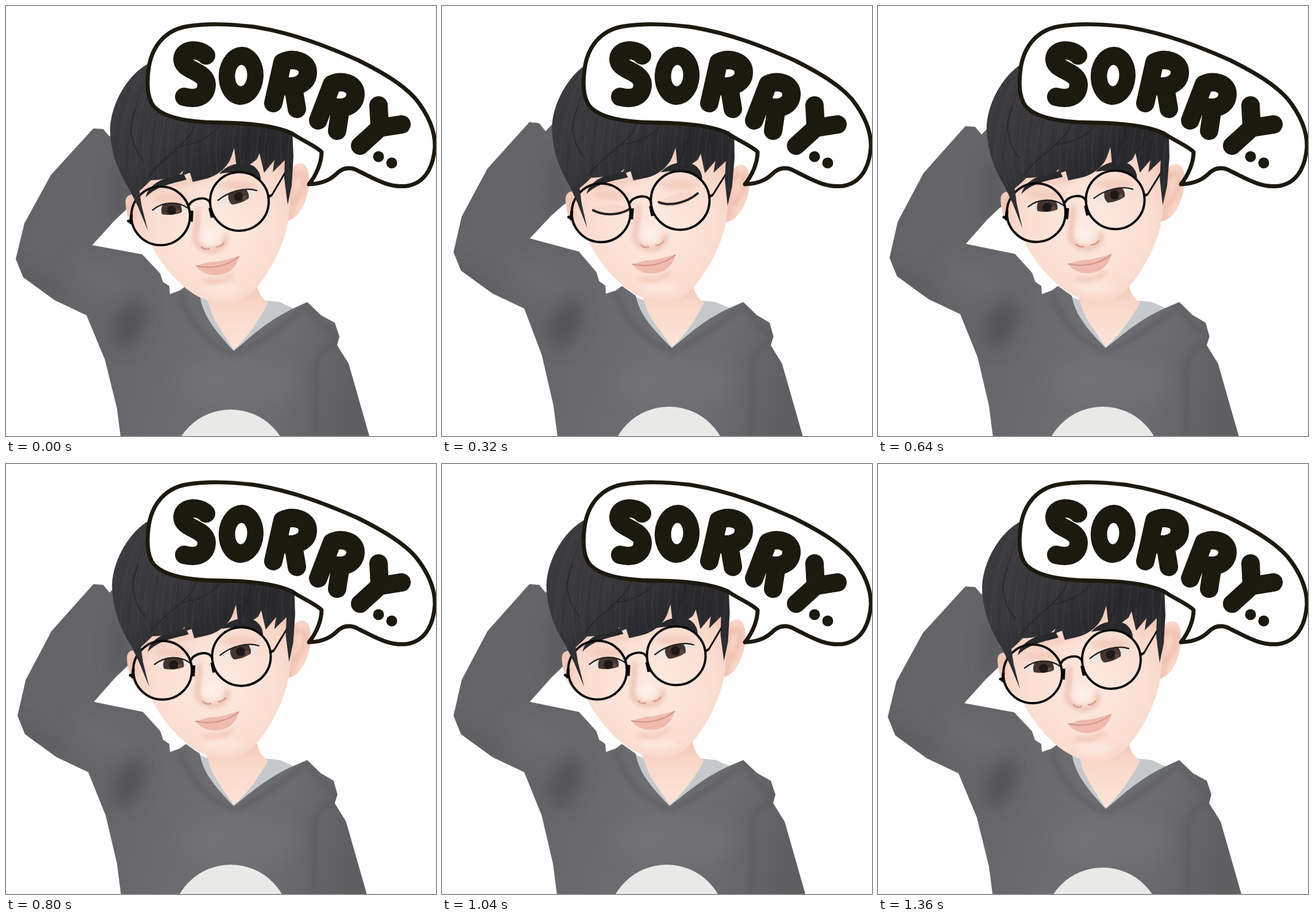
An HTML page that plays this animation: 748 by 748 pixels, repeating every 1440 ms.

```html
<!DOCTYPE html>
<html lang="en">
<head>
<meta charset="utf-8">
<title>Sorry</title>
<style>
html, body { margin: 0; width: 100%; height: 100%; overflow: hidden; background: #fefefe; }
svg { display: block; width: 100vw; height: 100vh; }
.ink { fill: none; stroke: #1c190e; stroke-linecap: round; stroke-linejoin: round; }
.wire { fill: none; stroke: #080808; stroke-width: 4; stroke-linecap: round; stroke-linejoin: round; }
</style>
</head>
<body>
<svg viewBox="0 0 748 748" role="img" aria-label="Sorry..">
  <defs>
    <linearGradient id="cloth" gradientUnits="userSpaceOnUse" x1="20" y1="420" x2="630" y2="560">
      <stop offset="0" stop-color="#646467"/><stop offset=".3" stop-color="#66666a"/>
      <stop offset=".6" stop-color="#6e6e72"/><stop offset=".8" stop-color="#6c6c70"/>
      <stop offset="1" stop-color="#5f5f62"/>
    </linearGradient>
    <radialGradient id="skin" gradientUnits="userSpaceOnUse" cx="365" cy="390" r="170">
      <stop offset="0" stop-color="#fdeae1"/><stop offset=".6" stop-color="#fbdfd3"/>
      <stop offset=".85" stop-color="#f8d5c7"/><stop offset="1" stop-color="#efc5b5"/>
    </radialGradient>
    <linearGradient id="throat" x1="0" y1="0" x2="0" y2="1">
      <stop offset="0" stop-color="#ecc0af"/><stop offset=".4" stop-color="#f9d8ca"/>
      <stop offset="1" stop-color="#fde4d9"/>
    </linearGradient>
    <linearGradient id="ear" x1="0" y1="0" x2="1" y2="0">
      <stop offset="0" stop-color="#eeb9a8"/><stop offset=".6" stop-color="#fad9cc"/>
      <stop offset="1" stop-color="#f6cdbf"/>
    </linearGradient>
    <linearGradient id="hair" gradientUnits="userSpaceOnUse" x1="185" y1="140" x2="330" y2="310">
      <stop offset="0" stop-color="#3d3d40"/><stop offset=".55" stop-color="#39393c"/>
      <stop offset="1" stop-color="#2a2a2d"/>
    </linearGradient>
    <filter id="soft" x="-60%" y="-60%" width="220%" height="220%"><feGaussianBlur stdDeviation="15"/></filter>
    <filter id="blur" x="-50%" y="-50%" width="200%" height="200%"><feGaussianBlur stdDeviation="4"/></filter>
    <clipPath id="inHoodie"><use href="#hoodie"/></clipPath>
    <clipPath id="inHair"><use href="#mane"/></clipPath>
    <clipPath id="inFace"><use href="#faceShape"/></clipPath>
    <clipPath id="inEyeL"><path id="clipL"/></clipPath>
    <clipPath id="inEyeR"><path id="clipR"/></clipPath>
  </defs>
  <rect width="748" height="748" fill="#fefefe"/>

  <path class="warp" fill="#c5c9cc" d="M337,506L352,512L396,590L440,512L458,513L476,515L500,526L470,570L396,610L340,560Z"/>
  <path class="warp" fill="url(#throat)" d="M340,485L354,522C358,540 368,555 396,598C412,585 438,552 456,516C444,508 436,496 434,470Z"/>
  <path id="hoodie" class="warp" fill="url(#cloth)" d="M152,213L169,214L180,227L200,205L235,270L222,345L209,354L188,374L150,416L237,432L268,465L273,480L284,487L285,501L302,495L313,487L337,504C343,535 355,555 396,600C425,577 450,550 500,526L524,515L548,538L572,551L580,575L576,590L596,622L636,762L201,762L193,700L172,615L140,538L85,512L30,472L17,440L32,378L78,294L130,237Z"/>
  <g clip-path="url(#inHoodie)">
    <g filter="url(#soft)">
      <ellipse cx="200" cy="320" rx="18" ry="62" fill="#525255" opacity=".5"/>
      <ellipse cx="55" cy="482" rx="62" ry="12" fill="#555558" opacity=".5" transform="rotate(28 55 482)"/>
      <ellipse cx="215" cy="552" rx="24" ry="46" fill="#4b4b4e" opacity=".65" transform="rotate(20 215 552)"/>
      <ellipse cx="170" cy="475" rx="60" ry="30" fill="#707073" opacity=".5" transform="rotate(30 170 475)"/>
      <ellipse cx="404" cy="655" rx="105" ry="46" fill="#76767a" opacity=".5"/>
    </g>
    <g class="folds" fill="none" stroke="#58585b" stroke-width="7" filter="url(#blur)" opacity=".55">
      <path class="warp" d="M302,497C316,548 350,590 396,606C440,590 488,552 526,519C542,550 562,568 582,577"/>
      <path class="warp" d="M578,588C548,592 534,618 540,655L538,750"/>
    </g>
    <circle id="belly" cx="391" cy="805" r="103" fill="#e9e9e8"/>
  </g>

  <g id="ears">
    <path d="M234 332C222 324 207 327 208 342C209 368 222 402 250 410Z" fill="url(#skin)"/>
    <path d="M228 340C216 336 214 350 222 372" fill="none" stroke="#e9b3a2" stroke-width="5" filter="url(#blur)"/>
    <path d="M484 300C496 280 506 272 515 274C527 277 530 300 525 324C518 354 504 374 484 374Z" fill="url(#ear)"/>
    <path d="M498 300C508 286 519 287 517 306C514 328 506 338 499 346" fill="none" stroke="#e9ad9b" stroke-width="6" filter="url(#blur)" opacity=".8"/>
  </g>

  <g id="jaw">
    <path id="faceShape" fill="url(#skin)" d="M226 330C228 270 270 235 360 225C450 220 492 250 495 300C496 350 491 384 483 405C468 448 445 482 425 501C410 513 396 518 378 517C350 515 334 507 314 492C290 473 268 445 254 418C238 390 227 362 226 330Z"/>
    <g clip-path="url(#inFace)" filter="url(#blur)">
      <path d="M240 318C300 310 330 312 390 272S460 285 495 280" fill="none" stroke="#eebfae" stroke-width="10" opacity=".6"/>
      <ellipse cx="376" cy="494" rx="32" ry="11" fill="#fde8df" opacity=".8"/>
    </g>
  </g>

  <g id="mouth">
    <path d="M343 477Q372 485 396 466" fill="none" stroke="#edbbab" stroke-width="5" filter="url(#blur)"/>
    <path d="M330 452C344 449 352 444 364 445C380 443 392 438 406 435C402 452 390 466 368 468C350 469 338 462 330 452Z" fill="#efbbae"/>
    <path d="M331 452C352 457 382 455 405 436" fill="none" stroke="#d4978a" stroke-width="2.2" stroke-linecap="round"/>
  </g>

  <g id="face">
    <g filter="url(#blur)">
      <path d="M333 352C334 376 330 390 329 405C332 420 348 427 362 425C376 422 386 412 381 398" fill="none" stroke="#e0a593" stroke-width="6" opacity=".8"/>
      <ellipse cx="354" cy="400" rx="11" ry="12" fill="#fff0ea"/>
      <ellipse cx="287" cy="334" rx="32" ry="8" fill="#f0c3b4" opacity=".7"/>
      <ellipse cx="403" cy="313" rx="33" ry="8" fill="#f0c3b4" opacity=".7"/>
    </g>
    <path d="M340 419Q346 425 353 422M366 419Q374 419 379 412" fill="none" stroke="#cf8f7e" stroke-width="2.5" stroke-linecap="round" opacity=".8"/>
    <path d="M243 333C247 310 276 296 309 292L314 302C294 308 262 312 243 333Z" fill="#29282a"/>
    <path d="M371 292C385 274 413 269 430 278C440 285 444 295 443 304C428 290 402 286 371 292Z" fill="#29282a"/>
    <g id="eyes"></g>
    <g class="wire">
      <circle cx="269" cy="365" r="51"/>
      <circle cx="406" cy="340" r="51"/>
      <path d="M319 346C322 336 349 328 355 343"/>
      <path d="M457 331L463 328L489 284M456 333L462 330" stroke-width="3"/>
      <path d="M218 364L217 377M213 374L218 376" stroke-width="5"/>
      <path d="M323 356L322 375M355 351L359 368" stroke-width="6" stroke-linecap="butt"/>
    </g>
  </g>

  <g id="head">
    <path id="mane" fill="url(#hair)" d="M246 101C212 120 183 168 181 214C182 260 198 292 214 318L229 348L247 391L236 348L232 322L243 312L252 303C270 303 288 298 300 294L309 286L304 296L320 290L325 306L346 301C368 296 386 280 392 262L397 247L401 280L424 276L436 267L441 256L449 290L467 268L464 289L485 268L484 300L490 346L497 312L500 262L498 215L420 120Z"/>
    <g clip-path="url(#inHair)" fill="none">
      <g id="strands"></g>
      <g stroke="#222225" stroke-width="2" opacity=".6">
        <path d="M226 180C208 215 222 250 240 270"/>
        <path d="M330 202C322 240 270 262 246 300"/>
        <path d="M374 205C352 232 330 240 302 244"/>
        <path d="M420 204C425 225 412 250 401 279"/>
        <path d="M452 208C466 230 448 250 441 258"/>
      </g>
    </g>
  </g>

  <g class="ink">
    <path stroke-width="7" style="fill:#fefefe" d="M527 310C540 294 549 272 549 254C540 244 515 234 498 222C470 208 425 204 380 203C330 203 285 198 263 180C246 168 244 138 248 110C253 70 277 43 312 36C350 30 385 31 430 36C500 47 560 71 612 94C660 118 692 138 713 162C732 186 747 215 746 246C743 282 728 308 698 313C666 317 640 300 615 288C600 279 588 281 578 289C566 301 553 309 527 310Z"/>
    <g stroke-width="32">
      <path d="M348 86C336 73 308 74 307 92C306 113 348 112 349 136C349 159 330 163 310 158"/>
      <path d="M465 169L481 98C500 89 525 96 525 115C525 134 507 141 489 140M500 143L506 179"/>
      <path d="M543 199L567 136C585 128 608 135 608 153C608 171 591 180 573 176M582 178L576 217"/>
      <path d="M648 173L650 210M688 206L650 212L616 243"/>
    </g>
    <g stroke="none" fill="#1c190e">
      <ellipse cx="409" cy="121.5" rx="39" ry="50.5" transform="rotate(3 409 121)"/>
      <ellipse cx="409" cy="121" rx="10.5" ry="18.5" fill="#fefefe" transform="rotate(3 409 121)"/>
      <circle cx="648" cy="262" r="9.5"/>
      <circle cx="671" cy="273" r="9.5"/>
    </g>
  </g>
</svg>
<script>
const $ = id => document.getElementById(id);
const set = (id, attrs) => { for (const k in attrs) $(id).setAttribute(k, attrs[k]); };
const clamp = v => Math.max(0, Math.min(1, v));
const mix = (a, b, k) => a + (b - a) * k;
const ease = (t, from, to) => { const k = clamp((t - from) / (to - from)); return k * k * (3 - 2 * k); };
const LOOP = 1440, STEP = 80;

// up, low and shut are lid bulges measured from the line between the corners
const EYES = [
  { id: 'L', x0: 255, y0: 355, x1: 317, y1: 352, up: 14, low: 13, shut: 10 },
  { id: 'R', x0: 369, y0: 338, x1: 436, y1: 321, up: 11, low: 19, shut: 12 }
];

$('eyes').innerHTML = EYES.map(e => {
  const x = (e.x0 + e.x1) / 2 + 2, y = (e.y0 + e.y1) / 2 + 2;
  return `<path id="lid${e.id}" fill="#f8d8cb"/>
    <g id="ball${e.id}" clip-path="url(#inEye${e.id})">
      <rect x="${x - 50}" y="${y - 30}" width="100" height="60" fill="#ebe6e4"/>
      <circle cx="${x}" cy="${y}" r="18" fill="#46352f"/>
      <circle cx="${x}" cy="${y}" r="8" fill="#1f1819"/>
      <circle cx="${x + 11}" cy="${y + 2}" r="4" fill="#6a4d45" opacity=".7"/>
    </g>
    <path id="lash${e.id}" fill="none" stroke="#252122" stroke-linecap="round"/>`;
}).join('');

let strands = '';
for (let i = 0; i < 46; i++) {
  const x = 190 + i * 7, wave = Math.sin(i * 2.4) * 9;
  strands += `<path d="M${x + 35} 120Q${x - 14 + wave} 215 ${x + 6 - wave} 320" stroke="${i % 3 ? '#505054' : '#242427'}" stroke-width="${1 + i % 2}" opacity=".25"/>`;
}
$('strands').innerHTML = strands;

const soft = [...document.querySelectorAll('.warp')].map(el => ({ el, d: el.getAttribute('d') }));

// The sleeve swings, the chest breathes and the hood and shoulder stay put
function bend(x, y, lift, raise, squeeze) {
  const arm = clamp((290 - x) / 130) * clamp((690 - y) / 150);
  const down = clamp((y - 213) / 220);
  const right = clamp((x - 500) / 70);
  const chest = clamp((y - 515) / 80) * (1 - arm);
  const left = clamp((x - 150) / 200);
  const dx = arm * 3 * lift * down + chest * mix(4 * raise * left, -4.5 * squeeze, right);
  const dy = -arm * (mix(4, 2, down) * lift + mix(7, 10, down) * raise) - chest * 5 * lift * (1 - right);
  return `${(x + dx).toFixed(2)},${(y + dy).toFixed(2)}`;
}

function drawEye(e, shut) {
  const { x0, x1 } = e, drop = 6 * shut;
  const y0 = e.y0 + drop, y1 = e.y1 + drop;
  const arc = (k, bulge) => `${mix(x0, x1, k)} ${mix(y0, y1, k) + bulge}`;
  const lid = bulge => `M${x0} ${y0}C${arc(.28, bulge)} ${arc(.72, bulge)} ${x1} ${y1}`;
  const lash = lid(mix(-e.up, e.shut, shut));
  const low = `C${arc(.75, e.low)} ${arc(.25, e.low)} ${x0} ${y0}Z`;
  set('clip' + e.id, { d: lash + low });
  set('ball' + e.id, { visibility: shut > .95 ? 'hidden' : 'visible' });
  set('lid' + e.id, { d: lid(-e.up) + low, opacity: shut });
  set('lash' + e.id, { d: lash, 'stroke-width': mix(2.4, 4, shut) });
}

function draw(t) {
  const lift = ease(t, 0, 160) * (1 - ease(t, 1060, 1360));
  const raise = ease(t, 0, 160) * (1 - ease(t, 300, 600));
  const sway = ease(t, 100, 320) * (1 - ease(t, 480, 980));
  const nod = 1 - ease(Math.abs(t - 160), 0, 160);
  const squeeze = lift * (1 - ease(t, 800, 1040));
  const blink = clamp(1 - Math.abs(t - 320) / 160);

  const move = (x, y, r, cx, cy) => `translate(${x} ${y}) rotate(${r} ${cx} ${cy})`;
  const head = move(7 * sway + .5 * lift, 1.3 * sway - 3 * lift - nod, 1.5 * sway, 355, 320);
  const jawY = 3 * sway - 6 * lift - 2 * nod;
  set('head', { transform: head });
  set('ears', { transform: head });
  set('face', { transform: move(6.5 * sway + 1.5 * lift + 3.3 * nod, 3 * sway - 6.5 * lift - 3 * nod, 1.5 * sway + .5 * nod, 338, 352) });
  set('jaw', { transform: `translate(${4 * sway + nod} ${jawY})` });
  set('mouth', { transform: `translate(${1.5 * sway - lift} ${jawY * .9})` });
  set('belly', { transform: `translate(${4 * raise} ${-5 * lift})` });
  for (const { el, d } of soft)
    el.setAttribute('d', d.replace(/([\d.]+),([\d.]+)/g, (_, x, y) => bend(+x, +y, lift, raise, squeeze)));
  EYES.forEach(e => drawEye(e, blink));
}

const begin = performance.now();
function tick() {
  const t = (performance.now() - begin) % LOOP;
  draw(Math.floor(t / STEP) * STEP);
  requestAnimationFrame(tick);
}
tick();
</script>
</body>
</html>
```
